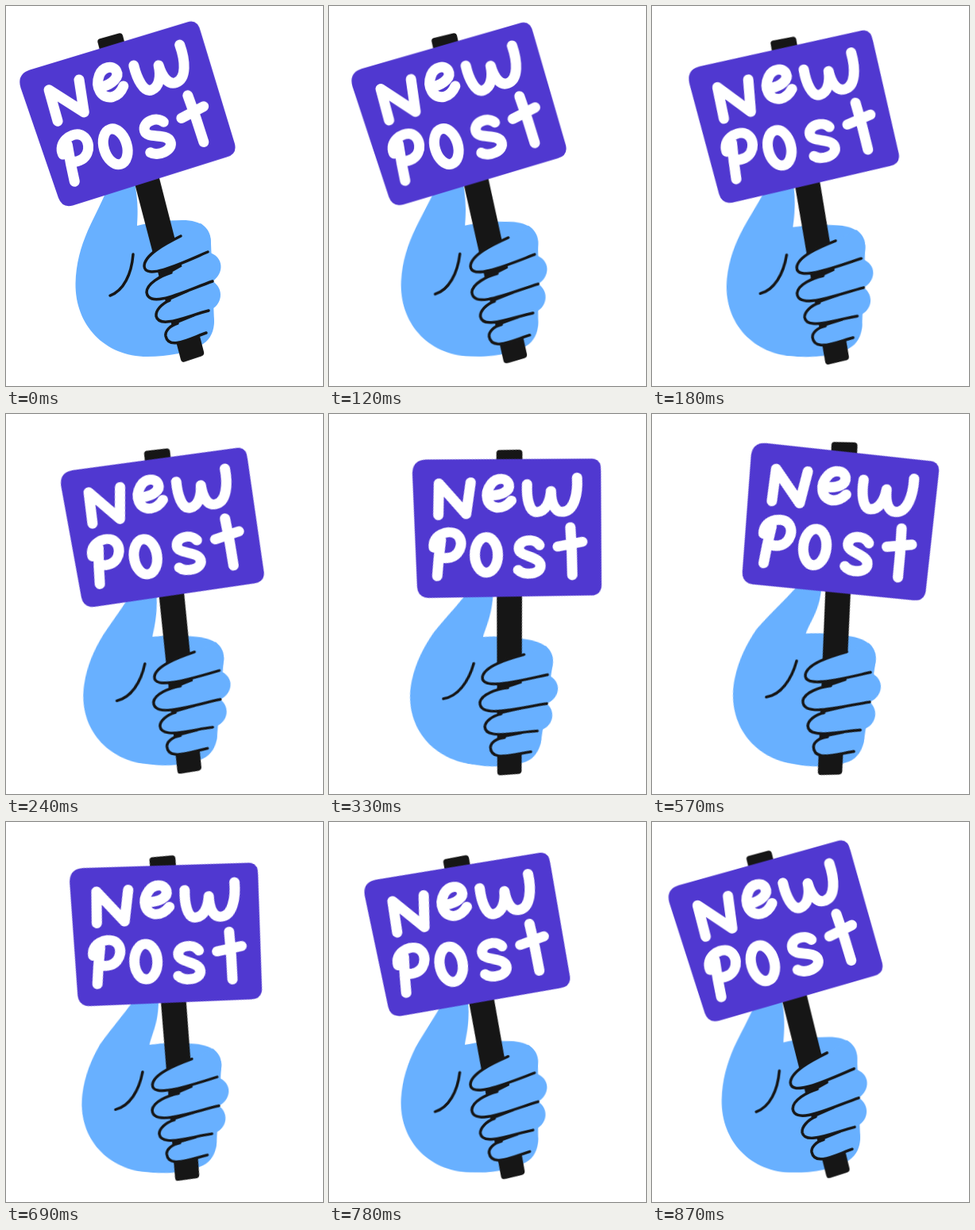
Recreate the animation shown at these times as an HTML page. Size 399x479 px, loop 0.9 s.

```html
<!DOCTYPE html>
<html lang="en">
<head>
<meta charset="utf-8">
<title>New post</title>
<style>
  html, body { margin: 0; width: 100%; height: 100%; overflow: hidden; background: #fff; }
  svg { display: block; width: 399px; height: 479px; }

  /* Each part swings 450 ms each way; the outer parts trail the hand. */
  .hand, .palm, .pole, .sign {
    animation: 450ms cubic-bezier(.3333, 0, .6667, 1) infinite alternate;
  }
  .hand { animation-name: hand; transform-origin: 182px 430px; }
  .palm { animation-name: thumb; animation-delay: -800ms; fill: #68b0ff; }
  .pole { animation-name: pole; animation-delay: -825ms; transform-origin: 217px 376px; }
  .sign { animation-name: sign; animation-delay: -780ms; transform-origin: 153px 135px; }
  .squash {
    transform-origin: 0 441px;
    animation: squash 225ms cubic-bezier(.37, 0, .63, 1) -395ms infinite alternate;
  }

  @keyframes hand { from { transform: rotate(0deg); } to { transform: rotate(13deg); } }
  @keyframes pole { from { transform: rotate(-.52deg); } to { transform: rotate(6.53deg); } }
  @keyframes sign { from { transform: rotate(-1.3deg); } to { transform: rotate(6.1deg); } }
  @keyframes squash { from { transform: scaleY(1.005); } to { transform: scaleY(.969); } }
  @keyframes thumb {
    from { d: path("M165 277C166 260 165 238 156 205L135 205C128 232 112 262 103 283C94 304 88 325 87.5 350C87 402 124 442 178 442C205 442 230 437 248 426C258 420 262 408 262 398L258 300C259 280 246 270 222 270C200 270 182 273 165 277Z"); }
    to { d: path("M165 277C168 258 179 242 172 205L152 205C136 235 116 260 103 283C94 304 88 325 87.5 350C87 402 124 442 178 442C205 442 230 437 248 426C258 420 262 408 262 398L258 300C259 280 246 270 222 270C200 270 182 273 165 277Z"); }
  }

  .ink { fill: #161616; }
  .skin { fill: #68b0ff; }
  .board { fill: #5038d0; }
  .line, .letters { fill: none; stroke-linecap: round; stroke-linejoin: round; }
  .line { stroke: #161616; stroke-width: 3.5; }
  .letters { stroke: #fff; stroke-width: 13; }
</style>
</head>
<body>
<svg viewBox="0 0 399 479" role="img" aria-label="Hand waving a sign: New post">
  <g class="squash">
    <g class="hand">
      <path class="palm" d="M165 277C166 260 165 238 156 205L135 205C128 232 112 262 103 283C94 304 88 325 87.5 350C87 402 124 442 178 442C205 442 230 437 248 426C258 420 262 408 262 398L258 300C259 280 246 270 222 270C200 270 182 273 165 277Z"/>
      <path class="line" d="M160 313C158 338 148 359 131 365"/>

      <g class="pole">
        <path class="ink" d="M119 41L142 34.5Q146 33.5 147 37L249 436Q250 440 246 441.5L225 448.5Q221 450 220 446L115.5 46Q114.500 42 119 41Z"/>
        <g class="sign">
          <path class="board" d="M30 80.500L228 20.500Q241 16 245 32L288 174Q291 187 278 190.500L84 251.500Q71 255 66 242L18.500 103Q13.500 86 30 80.500Z"/>
          <g class="letters" transform="translate(153 135) rotate(-17)">
            <path d="M-87 -16L-86 -57L-52 -17L-46 -58"/>
            <path d="M-20 -41C-8 -41 4 -46 2 -55C0 -64 -13 -65 -20 -56C-30 -43 -26 -26 -12 -25C-5 -25 1 -29 5 -34"/>
            <path d="M25 -55C24 -38 27 -18 38 -19C48 -20 54 -32 55 -46C55 -30 60 -18 70 -19C84 -20 89 -42 88 -63"/>
            <path d="M-84 16C-86 30 -88 48 -89 63M-93 26C-95 10 -76 3 -66 8C-54 15 -58 35 -72 39C-77 40 -82 40 -85 38"/>
            <ellipse cx="-27" cy="36" rx="14.5" ry="23"/>
            <path d="M40 24C34 14 14 16 14 28C14 39 40 38 41 50C42 62 20 64 13 56"/>
            <path d="M79 1Q81 32 81 63M63 26L94 20"/>
          </g>
        </g>
      </g>

      <g class="skin">
        <path d="M220 290C200 300 174 314 174 328C175 347 226 322 254 310C260 303 260 284 245 274Z"/>
        <path d="M208 336C195 340 177 350 177 361C180 383 228 358 260 347C274 338 276 316 254 310Z"/>
        <path d="M206 371C196 375 188 384 189 391C193 408 230 390 255 384C273 378 275 356 260 347Z"/>
        <path d="M216 400C206 403 200 410 201 416C205 435 234 418 252 412C264 407 265 390 255 384Z"/>
      </g>
      <g class="line">
        <path d="M220 290C200 300 174 314 174 328C175 347 226 322 254 310"/>
        <path d="M208 336C195 340 177 350 177 361C180 383 228 358 260 347"/>
        <path d="M206 371C196 375 188 384 189 391C193 408 230 390 255 384"/>
        <path d="M216 400C206 403 200 410 201 416C205 435 234 418 252 412"/>
      </g>
    </g>
  </g>
</svg>
</body>
</html>
```
